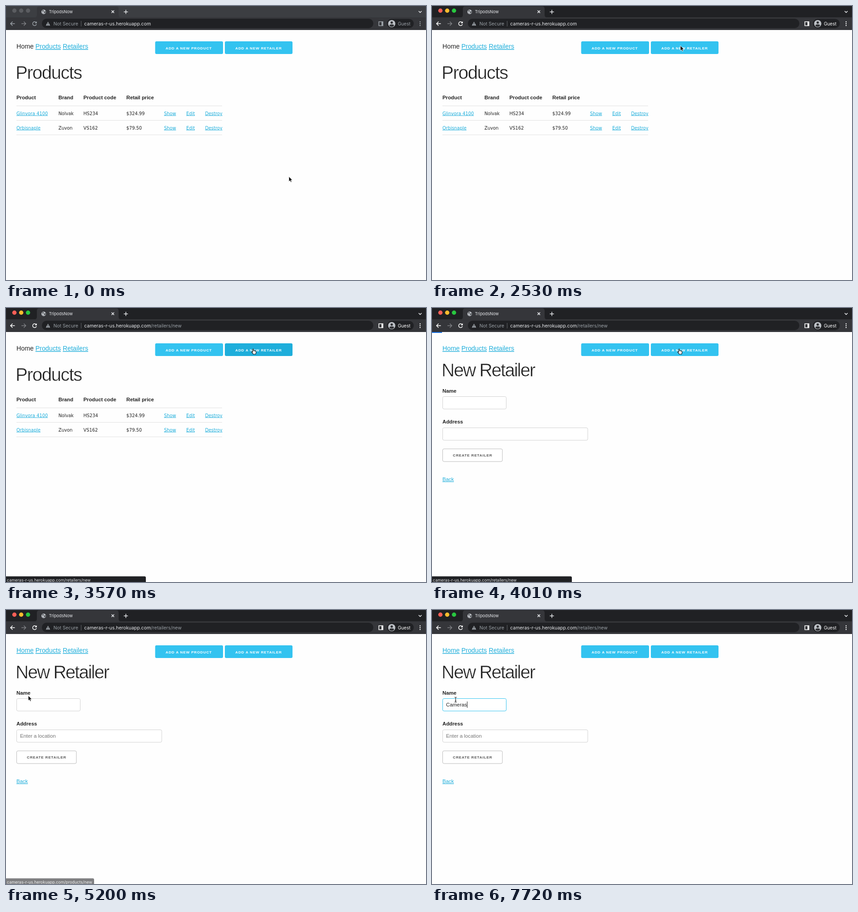
An HTML page for the animation above (8000 ms loop, 925 px wide and 605 px high).

```html
<!DOCTYPE html>
<html lang="en">
<head>
<meta charset="utf-8">
<title>New retailer</title>
<style>
  html, body { margin: 0; width: 100%; height: 100%; overflow: hidden; background: #fefefe; }
  svg { display: block; width: 925px; height: 605px; }
  text { white-space: pre; }
  .ui { font-family: Inter, Roboto, sans-serif; fill: #e8eaed; }
  .page { font: 11.3px "Liberation Sans", Arial, sans-serif; fill: #222; }
  .nav { font-size: 14.2px; }
  .bold { font-weight: 700; }
  .cell { font: 9.8px "DejaVu Sans", Verdana, sans-serif; }
  .link { fill: #1eaedb; text-decoration: underline; }
  .title { font-size: 40px; stroke: #fefefe; stroke-width: .6px; }
  .caps { font-size: 8.1px; font-weight: 700; letter-spacing: .8px; }
  .dim { fill: #9aa0a6; }
  .line { fill: none; stroke-width: 1.5; }
</style>
</head>
<body>
<svg viewBox="0 0 925 605" xmlns="http://www.w3.org/2000/svg">
  <rect width="925" height="605" fill="#fefefe"/>

  <g class="ui">
    <rect id="strip" width="925" height="26"/>
    <path d="M62 25.5q6 0 6-6V6q0-5 5-5H243q5 0 5 5V19.500q0 6 6 6Z" fill="#35363a"/>
    <rect y="25" width="925" height="28" fill="#35363a"/>
    <g id="lights"></g>
    <circle cx="83" cy="13" r="5" fill="#bdc1c6"/>
    <path d="M79.500 10.500l2.500-1.500 1.500 1.500-2 2.500zM84 12.500l3-1.500.5 2.500-2 3-1.500-1.500zM80 14.500l2 .5.5 2z" fill="#4a4c50"/>
    <text x="94.500" y="16" font-size="9.200">TripodsNow</text>
    <path d="M232.500 9.800l5.600 5.600m0-5.600l-5.600 5.600M259.500 13h9M264 8.500v9" class="line" stroke="#e8eaed" stroke-width="1.300"/>
    <path d="M908.800 11.200l3.300 3.200 3.300-3.200" class="line" stroke="#e8eaed"/>

    <rect x="79" y="28" width="730" height="21" rx="10.500" fill="#202124"/>
    <rect x="839" y="28.500" width="59" height="20.500" rx="10.200" fill="#202124"/>
    <path d="M43.500 39H34m5.200-4.500L43.700 39l-4.500 4.500" class="line" stroke="#7d7f83"/>
    <g id="icons">
      <path d="M19.500 39H10m4.500-4.500L10 39l4.500 4.500M66.700 36.800a4.300 4.300 0 1 0 .4 3.500" class="line" stroke="currentColor"/>
      <path d="M67.800 33.800v4.400h-4.400z" fill="currentColor"/>
      <rect x="821.200" y="34.700" width="8.800" height="8.800" class="line" stroke="currentColor"/>
      <path d="M827 34.500h3.500v9.500H827z" fill="currentColor"/>
      <circle cx="912" cy="35" r="1.200" fill="currentColor"/>
      <circle cx="912" cy="39" r="1.200" fill="currentColor"/>
      <circle cx="912" cy="43" r="1.200" fill="currentColor"/>
      <text x="863" y="42.600" font-size="10" fill="currentColor" style="fill:currentColor">Guest</text>
    </g>
    <circle cx="849.500" cy="39" r="8" fill="#bdc1c6"/>
    <circle cx="849.500" cy="36.500" r="2.600" fill="#303134"/>
    <path d="M844.300 43.500q0-3 5.200-3t5.200 3q-2 2.500-5.200 2.500t-5.200-2.500z" fill="#303134"/>
    <path d="M92.500 34.500l4.900 8.700h-9.800z" fill="#9aa0a6"/>
    <path d="M92.500 37.300v3.200m0 .8v1" stroke="#202124"/>
    <text x="104.500" y="42.700" font-size="10.300" class="dim">Not Secure</text>
    <path d="M165.500 33v12" stroke="#5f6368"/>
    <text x="172.300" y="42.700" font-size="10.400">cameras-r-us.herokuapp.com<tspan id="path" class="dim"></tspan></text>
  </g>
  <rect id="bar" y="53" height="2" fill="#1a73e8"/>

  <g class="page">
    <text id="home" x="23" y="94.200" class="nav">Home</text>
    <text x="64.800" y="94.200" class="nav link">Products</text>
    <text x="125" y="94.200" class="nav link">Retailers</text>
    <rect id="addProduct" x="328.500" y="78" width="149.500" height="28" rx="3"/>
    <rect id="addRetailer" x="482" y="78" width="149" height="28" rx="3"/>
    <g class="caps" fill="#fff">
      <text x="351.500" y="95.500">ADD A NEW PRODUCT</text>
      <text x="505" y="95.500">ADD A NEW RETAILER</text>
    </g>

    <g id="list">
      <text x="21" y="161.300" class="title" letter-spacing="-1.500">Products</text>
      <path d="M23 220.500H476M23 252.500H476M23 284.500H476" stroke="#e1e1e1"/>
    </g>

    <g id="form">
      <text x="21" y="150.500" class="title" letter-spacing="-2">New Retailer</text>
      <text x="23" y="186.500" class="bold">Name</text>
      <rect id="field" x="23.500" y="195.500" width="140" height="27.500" rx="3" fill="#fff"/>
      <text id="typed" x="31" y="213.300"></text>
      <path id="caret" d="M0 202v14" stroke="#222"/>
      <text x="23" y="255" class="bold">Address</text>
      <rect x="23.500" y="264.500" width="319.500" height="27.500" rx="3" fill="#fff" stroke="#d1d1d1"/>
      <text id="hint" x="31" y="282" fill="#757575">Enter a location</text>
      <rect x="23.500" y="311" width="131.500" height="28" rx="3" fill="#fff" stroke="#bbb"/>
      <text x="46" y="328.300" class="caps" fill="#555">CREATE RETAILER</text>
      <text x="23" y="382" class="link">Back</text>
    </g>
  </g>

  <g id="status" class="ui">
    <path id="bubble" fill="#202124"/>
    <text id="url" x="2" y="603.600" font-size="8.950"></text>
  </g>

  <g id="arrow"><path d="M0 0V11.300L2.600 8.900L4.200 12.700L6.200 11.900L4.600 8.200H8Z" stroke="#fff" stroke-width=".9"/></g>
  <g id="hand"><path d="M3 8V1.500a1 1 0 0 1 2 0V5a.9.9 0 0 1 1.800.2a.9.9 0 0 1 1.800.3a.9.9 0 0 1 1.700.5V8.500q0 1.500-1 3.500H4.200Q3 9.800 1 7.600Q.3 6.500 1.300 6.200Q2.200 6.200 3 7.600Z" fill="#fff" stroke="#111" stroke-width="1.100"/></g>
  <g id="beam"><path d="M-2.500-5.500Q0-5.500 0-4V4Q0 5.500-2.500 5.500M2.500-5.500Q0-5.500 0-4M0 4Q0 5.500 2.500 5.500M-1.500 2H1.500" fill="none" stroke="#222" stroke-width="1.100"/></g>
</svg>

<script>
const LOOP = 8000, STEP = 148;
const NS = "http://www.w3.org/2000/svg";
const $ = id => document.getElementById(id);
const set = (id, attrs) => { for (const k in attrs) $(id).setAttribute(k, attrs[k]); };
const show = (id, on) => { $(id).style.display = on ? "" : "none"; };

function add(parent, tag, attrs, text = "") {
  const el = document.createElementNS(NS, tag);
  for (const k in attrs) el.setAttribute(k, attrs[k]);
  el.textContent = text;
  $(parent).append(el);
  return el;
}

// Static parts
const cols = [23, 115.5, 170.5, 265, 348, 397, 438.5];
["Product", "Brand", "Product code", "Retail price"].forEach((s, i) =>
  add("list", "text", { x: cols[i], y: 206, class: "bold" }, s));
[["Glinvora 4100", "Nolvak", "HS234", "$324.99"],
 ["Orbisnaple", "Zuvon", "VS162", "$79.50"]].forEach((row, r) =>
  [...row, "Show", "Edit", "Destroy"].forEach((s, i) =>
    add("list", "text", { x: cols[i], y: 240.5 + 32 * r, class: i == 0 || i > 3 ? "cell link" : "cell" }, s)));
const lights = [18.5, 33.5, 48.5].map(cx => add("lights", "circle", { cx, cy: 10.3, r: 4.7 }));

// Pointer poses after the first glide: time, kind, x, y
const poses = [
  [2820, "hand", 540.3, 90], [4750, "hand", 455, 91], [4900, "hand", 352, 98],
  [5050, "arrow", 150, 152], [5200, "arrow", 49, 189], [5350, "beam", 51, 196],
  [5490, "beam", 52, 198]
];
// Status bubble: time, opacity, width, page
const bubbles = [
  [0, 0, 0, ""], [3120, .85, 190, "retailers"], [3270, 1, 190, "retailers"],
  [3570, 1, 308, "retailers"], [4750, 1, 194, "products"],
  [5200, .57, 194, "products"], [5350, 0, 0, ""]
];
const keys = [6680, 6830, 6980, 7120, 7270, 7570, 7720];
const last = (list, t) => list.filter(k => t >= k[0]).pop();

function pointer(t) {
  const pose = last(poses, t);
  if (pose) return pose.slice(1);
  const k = Math.max(0, Math.min(7, Math.floor((t - 1040) / STEP) + 1)) / 7;
  const e = k * k * (3 - 2 * k);
  return ["arrow", 623 - 76 * e, 376.5 - 289 * e];
}

function render(t) {
  const active = t >= 2530, form = t >= 4010;

  set("strip", { fill: active ? "#202124" : "#3c3e42" });
  lights.forEach((c, i) =>
    c.setAttribute("fill", active ? ["#ff5f57", "#febc2e", "#28c840"][i] : "#5b5d61"));
  $("icons").style.color = active ? "#fff" : "#9aa0a6";
  $("path").textContent = t >= 3570 ? "/retailers/new" : "";
  set("bar", { width: t >= 4300 ? 0 : t >= 4160 ? 643 : form ? 22 : 0 });

  show("list", !form);
  show("form", form);
  set("home", { class: form ? "nav link" : "nav" });
  const tint = over => ({ fill: over ? "#1eaedb" : "#33c3f0" });
  set("addRetailer", tint(t >= 2820 && t < 4010));
  set("addProduct", tint(t >= 4750 && t < 5050));
  show("hint", t >= 4300);

  const focus = t >= 5790;
  const word = "Cameras".slice(0, keys.filter(k => t >= k).length);
  set("field", { stroke: focus ? "#33c3f0" : "#d1d1d1" });
  $("typed").textContent = word;
  show("caret", focus && !(t >= 6240 && t < 6680));
  const end = word ? $("typed").getComputedTextLength() : 0;
  set("caret", { transform: `translate(${Math.round(31 + end) + .5} 0)` });

  const [, alpha, w, page] = last(bubbles, t);
  show("status", alpha > 0);
  set("status", { opacity: alpha });
  set("bubble", { d: `M0 592.500H${Math.max(0, w - 3)}q3 0 3 3V605H0Z` });
  $("url").textContent = `cameras-r-us.herokuapp.com/${page}/new`;

  const [kind, x, y] = pointer(t);
  for (const id of ["arrow", "hand", "beam"]) show(id, id == kind);
  set(kind, { transform: `translate(${x} ${y})` });
}

const start = performance.now();
function tick() {
  render((performance.now() - start) % LOOP);
  requestAnimationFrame(tick);
}
tick();
</script>
</body>
</html>
```
